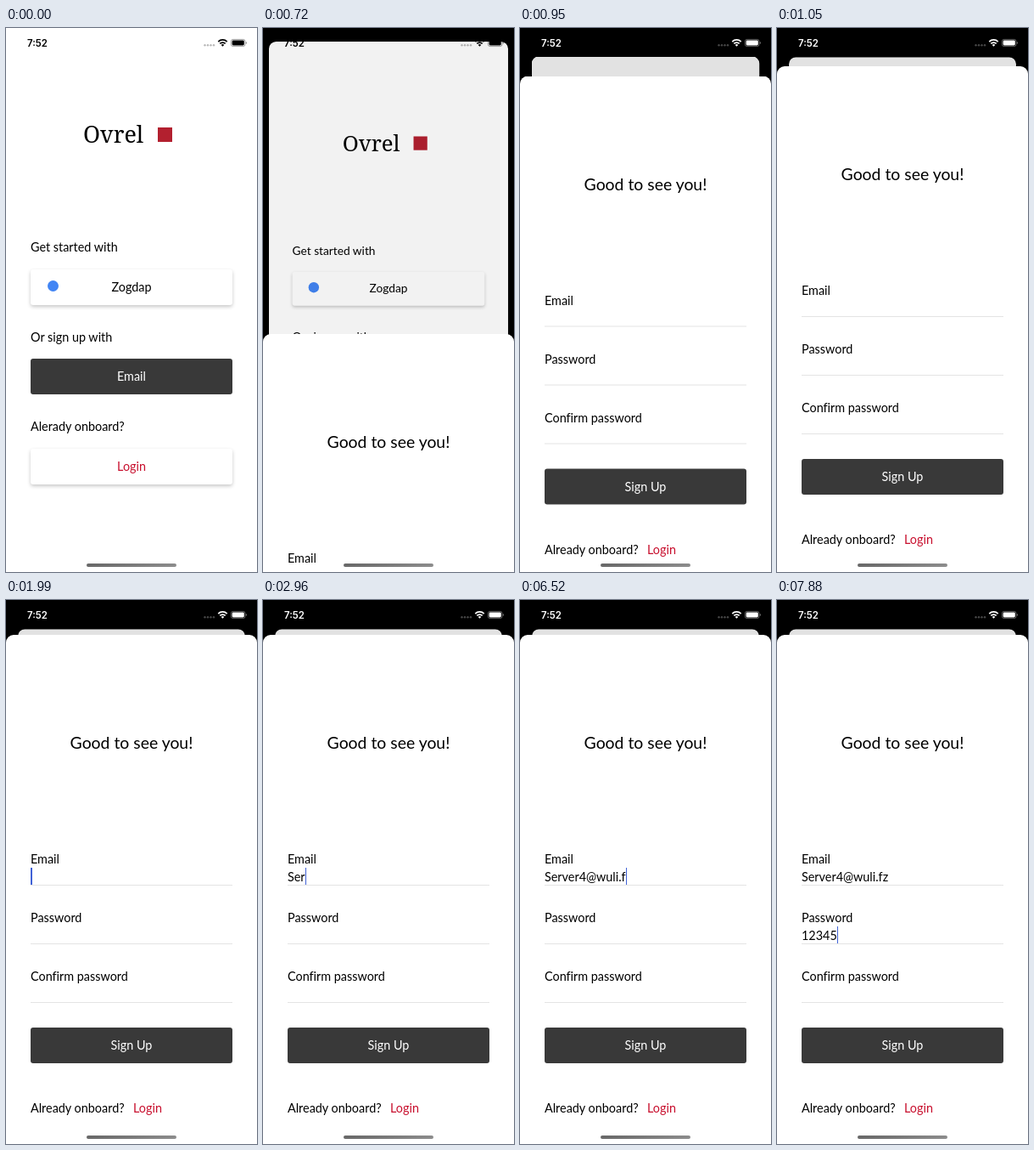
These frames come from a looping animation (296x640 px, 8 s). An HTML page:

```html
<!DOCTYPE html>
<html lang="en">
<head>
<meta charset="utf-8">
<title>Sign up</title>
<style>
  html, body { margin: 0; width: 100%; height: 100%; overflow: hidden; background: #000; }

  #stage {
    position: relative; width: 296px; height: 640px; overflow: hidden;
    background: #000; color: #000;
    font: 14.4px/20px Lato, sans-serif;
    font-variant-ligatures: none; white-space: pre;
  }
  #stage div, #stage svg { position: absolute; }

  .row { left: 29px; height: 20px; }
  .button {
    left: 29px; width: 238px; height: 42px; border-radius: 3px;
    line-height: 42px; text-align: center;
  }
  .light { background: #fff; box-shadow: 0 2px 4px rgba(0, 0, 0, .22); }
  .dark { background: #393939; color: #fff; }
  .red { color: #c8102e; }
  .line { left: 29px; width: 238px; height: 1px; background: #e4e4e4; }

  #page, #sheet, #bar, #dim, #tap {
    animation: 8s step-end infinite;
  }
  #page {
    inset: 0; background: #fff; overflow: hidden; transform-origin: 50% 0;
    animation-name: recede;
  }
  #dim { inset: 0; background: #000; opacity: 0; animation-name: dim; }
  #tap { inset: 0; animation-name: tap; }
  #sheet {
    left: 0; top: 0; width: 296px; height: 640px; background: #fff;
    border-radius: 9px 9px 0 0; transform: translateY(640px);
    animation-name: rise;
  }
  #bar { inset: 0 0 auto; height: 34px; animation-name: bar; }

  .brand { left: 91px; top: 105px; font: 27px/40px "Noto Serif", serif; }
  .mark { left: 179px; top: 117px; width: 17px; height: 17px; background: #b3202f; }
  .dot { left: 49px; top: 297px; width: 13px; height: 13px; border-radius: 50%; background: #4285f4; }
  .title { left: 0; width: 296px; top: 112px; line-height: 30px; font-size: 19.4px; text-align: center; }
  .clock { left: 25px; top: 8px; font: 600 11.4px/20px Inter, sans-serif; }
  .home {
    left: 95px; top: 630px; width: 106px; height: 4px; border-radius: 2px;
    background: linear-gradient(90deg, #686868, #8c8c8c);
  }
  .caret {
    display: inline-block; width: 1.5px; height: 21px; margin: -1px -2px 0 0;
    background: #4062d6; vertical-align: top;
  }

  @keyframes recede {
    0%      { transform: none; border-radius: 0; }
    9%      { transform: translateY(16px) scale(.953); border-radius: 9px; }
    10.5%   { transform: translateY(30px) scale(.917); border-radius: 9px; }
    11.875% { transform: translateY(33.6px) scale(.907); border-radius: 9px; }
    13.125%, 100% { transform: translateY(34.4px) scale(.905); border-radius: 9px; }
  }
  @keyframes dim {
    0% { opacity: 0; }
    9% { opacity: .05; }
    10.5% { opacity: .097; }
    11.875%, 100% { opacity: .112; }
  }
  @keyframes rise {
    0%      { transform: translateY(640px); }
    9%      { transform: translateY(360px); }
    10.5%   { transform: translateY(118px); }
    11.875% { transform: translateY(56.5px); }
    13.125% { transform: translateY(45px); }
    16.75%, 100% { transform: translateY(41px); }
  }
  @keyframes bar {
    0% { color: #000; }
    10.5%, 100% { color: #fff; }
  }
  @keyframes tap {
    0% { opacity: 1; }
    6.25%, 100% { opacity: .25; }
  }
</style>
</head>
<body>
<div id="stage">
  <div id="page">
    <div class="brand">Ovrel</div>
    <div class="mark"></div>
    <div class="row" style="top:248px">Get started with</div>
    <div class="button light" style="top:284px">Zogdap</div>
    <div class="dot"></div>
    <div class="row" style="top:354px">Or sign up with</div>
    <div class="button dark" style="top:389px"><div id="tap">Email</div></div>
    <div class="row" style="top:459px">Alerady onboard?</div>
    <div class="button light red" style="top:495px">Login</div>
    <div id="dim"></div>
  </div>

  <div id="sheet">
    <div class="title">Good to see you!</div>
    <div class="row" style="top:254px">Email</div>
    <div class="row" style="top:275px"><span id="mail"></span></div>
    <div class="line" style="top:294px"></div>
    <div class="row" style="top:323px">Password</div>
    <div class="row" style="top:344px"><span id="pass"></span></div>
    <div class="line" style="top:363px"></div>
    <div class="row" style="top:392px">Confirm password</div>
    <div class="line" style="top:432px"></div>
    <div class="button dark" style="top:462px">Sign Up</div>
    <div class="row" style="top:547px">Already onboard?</div>
    <div class="row red" style="top:547px;left:150px">Login</div>
  </div>

  <div id="bar">
    <div class="clock">7:52</div>
    <svg width="56" height="16" style="left:230px;top:10px" fill="currentColor">
      <g opacity=".28">
        <circle cx="4.5" cy="10.3" r="1.2"/><circle cx="8" cy="10.3" r="1.2"/>
        <circle cx="11.5" cy="10.3" r="1.2"/><circle cx="15" cy="10.3" r="1.2"/>
      </g>
      <g fill="none" stroke="currentColor" stroke-width="1.7">
        <path d="M20.3 6.1a7.4 7.4 0 0 1 10.4 0"/>
        <path d="M22.3 8.4a4.5 4.5 0 0 1 6.4 0"/>
      </g>
      <path d="M23.7 9.9a2.6 2.6 0 0 1 3.6 0L25.500 11.800z"/>
      <rect x="35.400" y="3.400" width="16.600" height="8.200" rx="2.300" fill="none" stroke="currentColor" stroke-width=".8" opacity=".45"/>
      <rect x="36.600" y="4.600" width="14.200" height="5.800" rx="1.300"/>
      <path d="M52.800 6v3a1.600 1.600 0 0 0 0-3z" opacity=".5"/>
    </svg>
  </div>
  <div class="home"></div>
</div>

<script>
  const LOOP = 8000;
  const PASS_FOCUS = 6870;
  // Each entry: time in ms, characters shown from then on
  const mail = {
    box: document.getElementById('mail'), text: 'Server4@wuli.fz',
    keys: [[2790, 2], [2960, 3], [3430, 4], [3550, 5], [3710, 6], [4010, 7], [5110, 8],
           [5340, 10], [5500, 11], [5700, 12], [6520, 14], [6870, 15]]
  };
  const pass = {
    box: document.getElementById('pass'), text: '12345',
    keys: [[7190, 1], [7310, 2], [7630, 4], [7880, 5]]
  };

  for (const field of [mail, pass]) {
    field.caret = document.createElement('span');
    field.caret.className = 'caret';
    field.box.after(field.caret);
  }

  function caretAlpha(t) {
    if (t < 1790) return 0;
    if (t >= 2500 && t < 2610) return 0.45;
    if (t >= 2610 && t < 2790) return 0;
    return 1;
  }

  function show(field, t, alpha) {
    let count = 0;
    for (const [time, n] of field.keys) if (t >= time) count = n;
    const value = field.text.slice(0, count);
    if (field.box.textContent !== value) field.box.textContent = value;
    field.caret.style.opacity = alpha;
  }

  let start;
  function frame(now) {
    start ??= now;
    const t = (now - start) % LOOP;
    const inPass = t >= PASS_FOCUS;
    show(mail, t, inPass ? 0 : caretAlpha(t));
    show(pass, t, inPass ? 1 : 0);
    requestAnimationFrame(frame);
  }
  requestAnimationFrame(frame);
</script>
</body>
</html>
```
